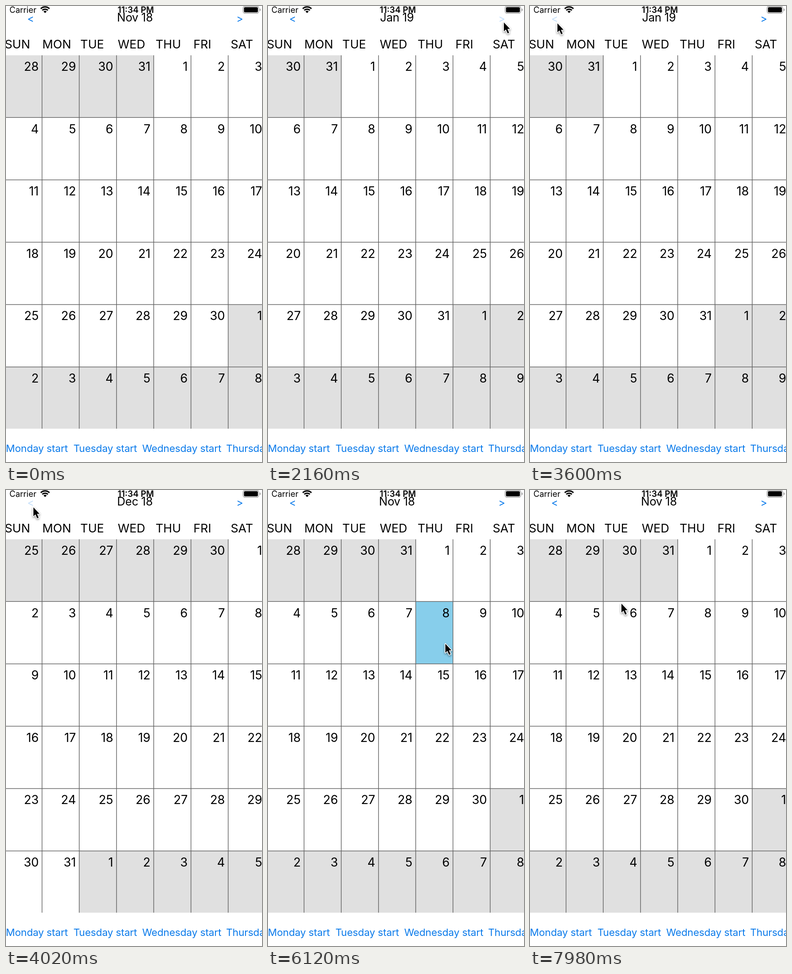
Write an HTML page with a canvas that moves like this. It is 560 px wide and 999 px high and loops after 8 s.

```html
<!DOCTYPE html>
<html lang="en">
<head>
<meta charset="utf-8">
<title>Month calendar</title>
<style>
  html, body { margin: 0; height: 100%; overflow: hidden; background: #fff; }
  canvas { display: block; width: 560px; height: 999px; }
</style>
</head>
<body>
<canvas width="560" height="999"></canvas>
<script>
const ctx = document.querySelector('canvas').getContext('2d');
const LOOP = 8000, STEP = 60;
const BLUE = '#0a7aea', GREY = '#e0e0e0', LINE = '#626262', SELECTED = '#87ceeb';
const MONTHS = 'Jan Feb Mar Apr May Jun Jul Aug Sep Oct Nov Dec'.split(' ');
const GRID = { left: -2.65, top: 108, bottom: 926, cellW: 81.45, cellH: 136.6 };

// Times at which each arrow is released; every release turns one month.
const NEXT = [1580, 2120, 2660], PREV = [3570, 3990, 4410];
const PRESS = 220, FADE_IN = 150, FADE_OUT = 250, DIMMED = 0.2;

const SELECTIONS = [[5460, 5970, 2], [5970, 6420, 4]]; // from, to, column in the second week

// Pointer stops: time, x, y
const PATH = [
  [600, 562, 190], [1200, 515, 35], [2800, 515, 35], [3300, 59, 37],
  [4560, 59, 37], [5080, 171, 292], [5300, 196, 312], [5600, 196, 312],
  [5900, 387, 336], [6600, 387, 336], [7400, 230, 270], [7900, 199, 248]
];

const ease = p => p * p * (3 - 2 * p);
const clamp = p => Math.max(0, Math.min(1, p));

function label(text, x, y, size, { align = 'center', color = '#000', weight = 400, spacing = 0 } = {}) {
  ctx.font = `${weight} ${size}px Inter, sans-serif`;
  ctx.letterSpacing = spacing + 'px';
  ctx.textAlign = align;
  ctx.fillStyle = color;
  ctx.fillText(text, x, y);
}

function roundBox(x, y, w, h, r) {
  ctx.beginPath();
  ctx.roundRect(x, y, w, h, r);
}

function drawStatusBar() {
  label('Carrier', 37, 15, 18);
  label('11:34 PM', 284, 15, 18.5, { weight: 600 });

  ctx.save();
  ctx.beginPath();
  ctx.moveTo(85.5, 15.5);
  ctx.arc(85.5, 15.5, 18, -Math.PI * 0.75, -Math.PI * 0.25);
  ctx.clip();
  ctx.fillStyle = ctx.strokeStyle = '#000';
  ctx.lineWidth = 3;
  for (const r of [8.6, 13.5]) {
    ctx.beginPath();
    ctx.arc(85.5, 15.5, r, Math.PI, 0);
    ctx.stroke();
  }
  ctx.beginPath();
  ctx.arc(85.5, 15.5, 5, 0, 7);
  ctx.fill();
  ctx.restore();

  ctx.strokeStyle = ctx.fillStyle = '#999';
  ctx.lineWidth = 1.3;
  roundBox(518.5, 0.5, 34.5, 15.5, 4.5);
  ctx.stroke();
  roundBox(555, 5.5, 2, 5.5, [0, 2, 2, 0]);
  ctx.fill();
  ctx.fillStyle = '#000';
  roundBox(520.5, 2.5, 30.5, 11.5, 2.5);
  ctx.fill();
}

function arrowOpacity(t, releases) {
  let alpha = 1;
  for (const release of releases) {
    const down = ease(clamp((t - release + PRESS) / FADE_IN));
    const up = ease(clamp((t - release) / FADE_OUT));
    alpha = Math.min(alpha, 1 - (1 - DIMMED) * (down - up));
  }
  return alpha;
}

function drawHeader(t, first) {
  label(`${MONTHS[first.getMonth()]} ${first.getFullYear() % 100}`, 282, 33.5, 25, { spacing: -0.3 });
  for (const [sign, x, releases] of [['<', 54, PREV], ['>', 511.5, NEXT]]) {
    ctx.globalAlpha = arrowOpacity(t, releases);
    label(sign, x, 35.5, 22.5, { color: BLUE });
    ctx.globalAlpha = 1;
  }
  const centers = [25, 111, 188.5, 274.5, 355, 429.5, 516];
  'SUN MON TUE WED THU FRI SAT'.split(' ').forEach((day, i) => label(day, centers[i], 93, 26));
}

function drawGrid(t, first) {
  const { left, top, bottom, cellW, cellH } = GRID;
  const selection = SELECTIONS.find(([from, to]) => t >= from && t < to);
  for (let i = 0; i < 42; i++) {
    const col = i % 7, row = Math.floor(i / 7);
    const x = left + col * cellW, y = top + row * cellH;
    const date = new Date(first.getFullYear(), first.getMonth(), 1 - first.getDay() + i);
    const selected = selection && row === 1 && col === selection[2];
    ctx.fillStyle = selected ? SELECTED : date.getMonth() === first.getMonth() ? '#fff' : GREY;
    ctx.fillRect(x, y, cellW, Math.min(cellH, bottom - y));
    label(date.getDate(), x + 74.2, y + 34, 26.5, { align: 'right', spacing: -0.1 });
  }
  ctx.fillStyle = LINE;
  for (let col = 1; col < 7; col++) ctx.fillRect(left + col * cellW - 0.7, top, 1.4, bottom - top);
  for (let row = 1; row < 6; row++) ctx.fillRect(0, top + row * cellH - 1, 560, 1.4);
}

function drawFooter() {
  const style = { color: BLUE, spacing: -0.15 };
  label('Monday start', 67.5, 977, 22, style);
  label('Tuesday start', 217, 977, 22, style);
  label('Wednesday start', 384.5, 977, 22, style);
  label('Thursday start', 481.5, 977, 22, { ...style, align: 'left' });
}

function drawPointer(t) {
  if (t < PATH[0][0]) return;
  let [, x, y] = PATH[PATH.length - 1];
  const next = PATH.findIndex(stop => stop[0] > t);
  if (next > 0) {
    const [t0, x0, y0] = PATH[next - 1], [t1, x1, y1] = PATH[next];
    const p = ease((t - t0) / (t1 - t0));
    x = x0 + (x1 - x0) * p;
    y = y0 + (y1 - y0) * p;
  }
  ctx.save();
  ctx.translate(x, y);
  const arrow = new Path2D('M1 1V20.5L5.4 16.4L9.2 25L12.4 23.6L8.8 15.2H14.4Z');
  ctx.lineJoin = 'round';
  ctx.lineWidth = 3;
  ctx.strokeStyle = '#fff';
  ctx.shadowColor = 'rgba(0,0,0,.45)';
  ctx.shadowBlur = 4;
  ctx.shadowOffsetY = 2;
  ctx.stroke(arrow);
  ctx.shadowColor = 'transparent';
  ctx.fillStyle = '#000';
  ctx.fill(arrow);
  ctx.restore();
}

function draw(t) {
  const turns = releases => releases.filter(release => t >= release).length;
  const first = new Date(2018, 10 + turns(NEXT) - turns(PREV), 1);
  ctx.fillStyle = '#fff';
  ctx.fillRect(0, 0, 560, 999);
  drawGrid(t, first);
  drawStatusBar();
  drawHeader(t, first);
  drawFooter();
  drawPointer(t);
}

const start = performance.now();
function tick() {
  const t = (performance.now() - start) % LOOP;
  draw(Math.floor(t / STEP) * STEP);
  requestAnimationFrame(tick);
}
tick();
</script>
</body>
</html>
```
